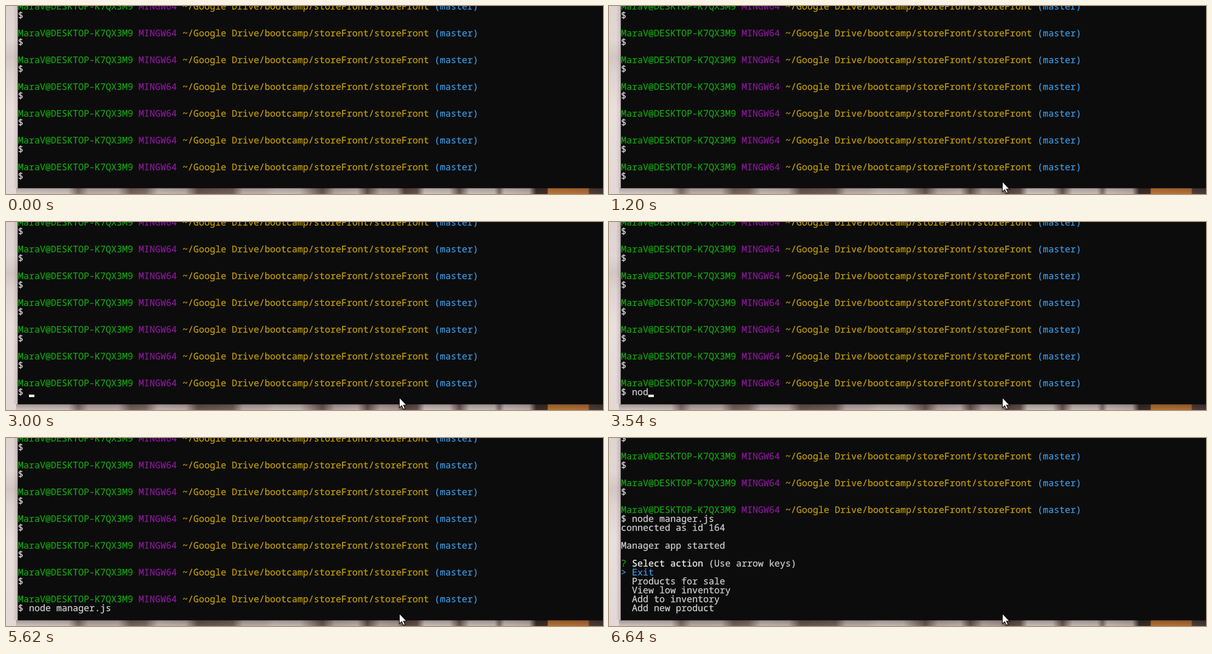
An HTML page for the animation above (8000 ms loop, 1198x379 px).

```html
<!DOCTYPE html>
<html lang="en">
<head>
<meta charset="utf-8">
<title>Terminal session</title>
<style>
html, body { margin: 0; width: 100%; height: 100%; overflow: hidden; background: #0c0c0c; }
svg { display: block; width: 1198px; height: 379px; }
text {
  font: 18.3333px "Noto Sans Mono", "DejaVu Sans Mono", monospace;
  white-space: pre;
  text-rendering: geometricPrecision;
  color: #ccc;
}
tspan { fill: currentColor; stroke: currentColor; stroke-width: .3px; }
.green { color: #13a10e; }
.purple { color: #881798; }
.gold { color: #c19c00; }
.blue { color: #3a96dd; }
.white { color: #f2f2f2; }
</style>
</head>
<body>
<svg viewBox="0 0 1198 379">
  <defs>
    <linearGradient id="side" x2="0" y2="1">
      <stop offset="0" stop-color="#e0d4d2"/>
      <stop offset=".18" stop-color="#e2d7d5"/>
      <stop offset=".27" stop-color="#d3c6c4"/>
      <stop offset=".36" stop-color="#dfd3d1"/>
      <stop offset=".55" stop-color="#eadfdd"/>
      <stop offset="1" stop-color="#e4d8d6"/>
    </linearGradient>
    <linearGradient id="edge">
      <stop offset="0" stop-color="#000" stop-opacity="0"/>
      <stop offset="1" stop-color="#000" stop-opacity=".16"/>
    </linearGradient>
    <linearGradient id="under" x2="0" y2="1">
      <stop offset="0" stop-color="#000" stop-opacity=".3"/>
      <stop offset="1" stop-color="#000" stop-opacity=".08"/>
    </linearGradient>
    <linearGradient id="strip" gradientUnits="userSpaceOnUse" x1="0" x2="1198" y1="0" y2="0"></linearGradient>
  </defs>
  <rect width="24" height="379" fill="url(#side)"/>
  <rect x="24" y="367" width="1174" height="12" fill="url(#strip)"/>
  <g id="shadow">
    <rect x="14" width="10" height="367" fill="url(#edge)"/>
    <rect x="20" y="367" width="1178" height="12" fill="url(#under)"/>
  </g>
  <path id="frame" d="M23.5 0V367.5H1198" fill="none" stroke="#000"/>
  <rect x="24" width="1174" height="367" fill="#0c0c0c"/>
  <g id="page"></g>
  <rect id="cell" x="783" y="354" width="11" height="13" fill="#f3f3f3"/>
  <rect id="caret" y="348" width="11" height="5"/>
  <circle id="click" cx="789" cy="353" r="15" fill="#ff0" fill-opacity=".5"/>
  <path id="pointer" d="M0 0V20.5L4.7 16.2L8 23.5L11.2 22L8 15H14.4Z" fill="#fff" stroke="#000" stroke-width="1.1"/>
</svg>
<script>
const NS = "http://www.w3.org/2000/svg";
const LOOP = 8000, COL = 11, ROW = 18, LEFT = 24, LAST = 336;
const $ = id => document.getElementById(id);

function add(parent, tag, attrs, content = "") {
  const el = document.createElementNS(NS, tag);
  for (const name in attrs) el.setAttribute(name, attrs[name]);
  el.textContent = content;
  return parent.appendChild(el);
}

// One terminal line from [text, class] runs; top is the top of its row.
function line(parent, top, ...runs) {
  const el = add(parent, "text", { x: LEFT, y: top + 13 });
  for (const [text, cls = ""] of runs) add(el, "tspan", { class: cls }, text);
  return el;
}

// Soft bands of the wallpaper below the window
const bands = [
  [0, "#e4d8d6"], [125, "#dccfcc"], [145, "#8a7570"], [165, "#c9b9b5"], [225, "#cbbbb7"],
  [250, "#7d6862"], [280, "#8a7570"], [305, "#d3c6c2"], [360, "#cbbab6"], [385, "#705b56"],
  [455, "#7d6862"], [475, "#c9b9b5"], [520, "#cbbbb7"], [540, "#d8cbc8"], [590, "#d3c6c2"],
  [635, "#705b56"], [660, "#c4b3af"], [705, "#cfc0bc"], [725, "#6b5650"], [750, "#c4b3af"],
  [785, "#b9a7a2"], [800, "#5f4a45"], [825, "#705b56"], [840, "#dccfcc"], [890, "#d6c9c5"],
  [910, "#705b56"], [930, "#d8cbc8"], [980, "#d3c6c2"], [990, "#8a7570"], [1000, "#d6c8c5"],
  [1050, "#c9b8b4"], [1064, "#3f302c"], [1086, "#473226"], [1088, "#c87d3a"], [1168, "#c0773a"],
  [1171, "#54443f"], [1198, "#4a3d3a"]
];
for (const [x, color] of bands) add($("strip"), "stop", { offset: x / 1198, "stop-color": color });

const page = $("page");
for (let top = -6; top < LAST; top += 3 * ROW) {
  line(page, top, ["MaraV@DESKTOP-K7QX3M9 ", "green"], ["MINGW64 ", "purple"],
    ["~/Google Drive/bootcamp/storeFront/storeFront ", "gold"], ["(master)", "blue"]);
  if (top + ROW < LAST) line(page, top + ROW, ["$"]);
}
const input = line(page, LAST, ["$ "], [""]).lastChild;

const output = add(page, "g", {});
[
  [["connected as id 164"]],
  [],
  [["Manager app started"]],
  [],
  [["? ", "green"], ["Select action ", "white"], ["(Use arrow keys)"]],
  [["> Exit", "blue"]],
  [["  Products for sale"]],
  [["  View low inventory"]],
  [["  Add to inventory"]],
  [["  Add new product"]]
].forEach((runs, i) => line(output, LAST + (i + 1) * ROW, ...runs));

const COMMAND = "node manager.js ";
// [time, typed characters, caret column or -1 when hidden]
const typing = [
  [0, 0, -1], [1900, 0, 2], [2460, 0, -1], [3000, 0, 2], [3080, 1, 3], [3230, 2, 4],
  [3540, 3, 5], [3770, 4, 6], [3930, 4, -1], [4000, 5, 7], [4470, 6, 8], [4550, 7, 9],
  [4630, 7, -1], [4710, 8, 10], [4790, 9, 11], [5090, 10, 12], [5470, 16, 18],
  [5620, 16, -1], [5870, 16, 0], [6170, 16, -1]
];
const scroll = [[0, 0], [5870, 1], [6640, 10]];

// Pointer glides in from the right in eight steps, then settles.
const moves = [[0, 882, 400]];
for (let i = 0; i < 8; i++) {
  const rest = (1 - i / 7) ** 2;
  moves.push([280 + i * 540 / 7, 781.5 + 100 * rest, 354 + 18 * rest]);
}
moves.push([970, 785.5, 355], [1050, 787.5, 355], [1200, 789.5, 354]);

const at = (table, t) => table.findLast(row => row[0] <= t);
const show = (el, on) => el.setAttribute("visibility", on ? "visible" : "hidden");

function draw(t) {
  const [, typed, col] = at(typing, t);
  const [, rows] = at(scroll, t);
  const [, x, y] = at(moves, t);
  input.textContent = COMMAND.slice(0, typed);
  page.setAttribute("transform", `translate(0 ${-rows * ROW})`);
  show(output, t >= 6640);
  show($("caret"), col >= 0);
  $("caret").setAttribute("x", LEFT + Math.max(col, 0) * COL);
  $("caret").setAttribute("fill", rows ? "#ccc" : "#f3f3f3");
  $("pointer").setAttribute("transform", `translate(${x} ${y})`);
  show($("click"), t >= 2080 && t < 2130);
  show($("cell"), t >= 2080 && t < 3000);
  const focused = t >= 1430;
  $("shadow").setAttribute("opacity", focused ? 1 : 0.75);
  $("frame").setAttribute("stroke-opacity", focused ? 0.5 : 0.35);
}

const start = performance.now();
function tick() {
  draw((performance.now() - start) % LOOP);
  requestAnimationFrame(tick);
}
tick();
</script>
</body>
</html>
```
